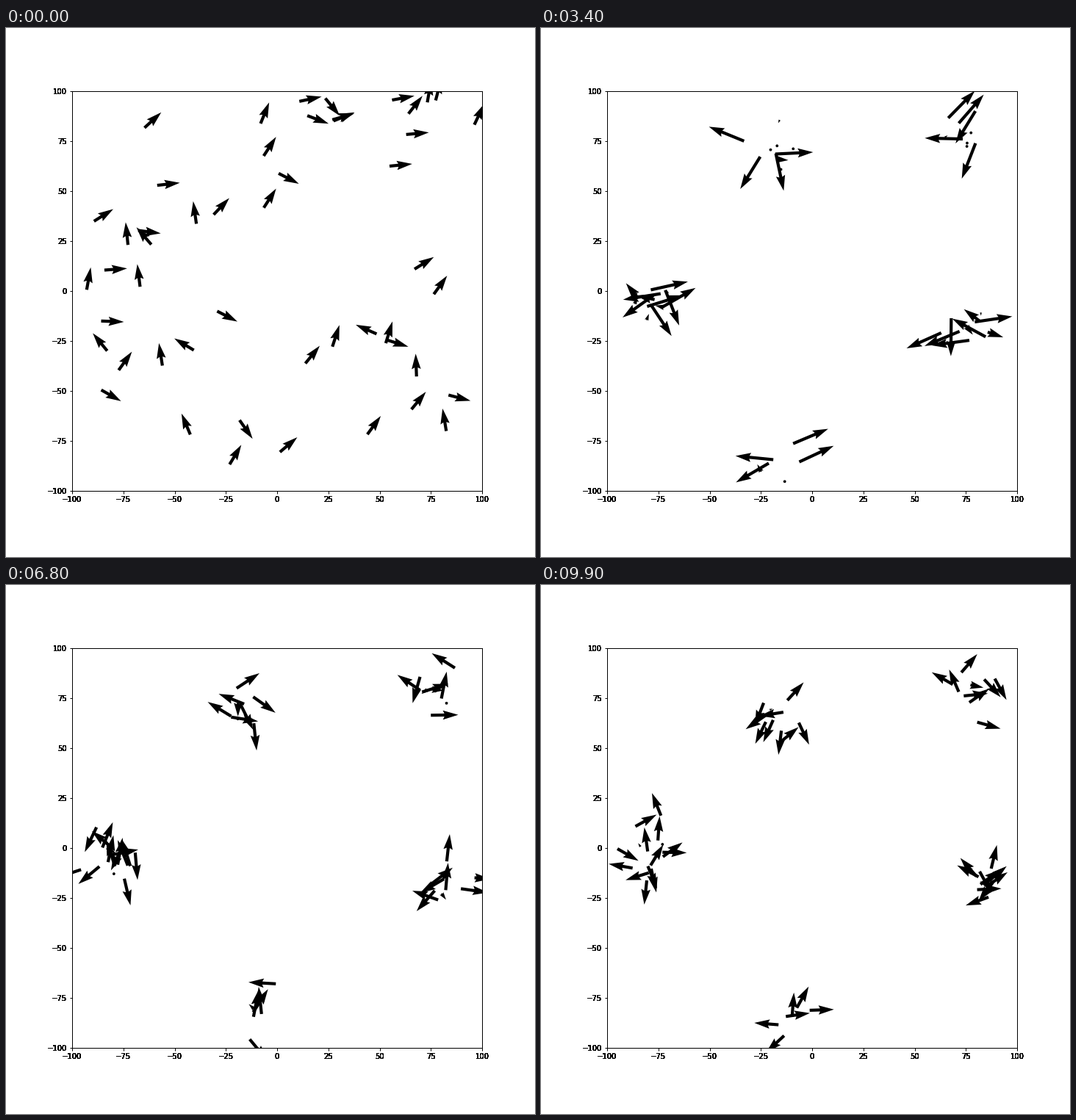
These frames come from a looping animation (720x720 px, 10 s). A matplotlib script:

```python
import numpy as np
import matplotlib.pyplot as plt
from matplotlib.animation import FuncAnimation

FRAMES, INTERVAL = 100, 100
LIMIT, TICK = 100, 25
TOP_SPEED = 2.6
CENTRES = np.array([(-75, -4), (-17, 70), (75, 80), (83, -17), (-10, -85)])
SIZES = [15, 10, 9, 10, 6]


def polar(length, angle):
    return np.column_stack([length * np.cos(angle), length * np.sin(angle)])


def lengths(vec):
    return np.linalg.norm(vec, axis=1)


def fold(pos, edge=97):
    """Reflect points beyond the edge back into the box."""
    return np.where(np.abs(pos) > edge, np.sign(pos) * 2 * edge - pos, pos)


def simulate():
    """Agents fly in from around their centre, then mill about it."""
    rng = np.random.default_rng(7)
    centre = np.repeat(CENTRES, SIZES, axis=0)
    n = len(centre)
    home = centre + rng.normal(0, 3.5, (n, 2))
    pos = fold(centre + polar(rng.uniform(10, 58, n),
                              rng.uniform(-np.pi, np.pi, n)))
    vel = polar(TOP_SPEED, np.radians(rng.normal(55, 50, n)))

    states = []
    for t in range(FRAMES):
        states.append((pos, vel))
        to_home = home - pos
        dist = lengths(to_home)
        bearing = np.arctan2(to_home[:, 1], to_home[:, 0])

        # far agents turn smoothly at top speed
        steer = 0.6 * vel + 0.4 * polar(TOP_SPEED, bearing)
        steer *= TOP_SPEED / np.maximum(lengths(steer), 1e-6)[:, None]

        # near agents pick a fresh heading now and then
        busy = 0.8 - 0.7 * np.exp(-t / 22)
        lazy = TOP_SPEED * 0.6 * rng.random(n) ** 2
        speed = np.where(rng.random(n) < busy, TOP_SPEED, lazy)
        angle = np.where(dist > 6, bearing + rng.normal(0, 0.6, n),
                         rng.uniform(-np.pi, np.pi, n))
        fresh = rng.random(n) < np.where(dist > 8, 0.7, 0.4)
        drift = np.where(fresh[:, None], polar(speed, angle), vel)

        near = dist < 11 + 12 * np.exp(-t / 20)
        vel = np.where(near[:, None], drift, steer)
        pos = pos + vel
    return states


def mean_scale(vel):
    return 18 * lengths(vel).mean()


def overprint_labels(ax, copies=12):
    """Repeat the tick labels in place, which makes them heavy."""
    x_trans, x_va, x_ha = ax.get_xaxis_text1_transform(7)
    y_trans, y_va, y_ha = ax.get_yaxis_text1_transform(7)
    for v in range(-LIMIT, LIMIT + 1, TICK):
        label = str(v).replace("-", "\u2212")
        for _ in range(copies):
            ax.text(v, 0, label, transform=x_trans, va=x_va, ha=x_ha)
            ax.text(0, v, label, transform=y_trans, va=y_va, ha=y_ha)


states = simulate()

plt.rcParams.update({"axes.linewidth": 1,
                     "xtick.major.width": 1, "ytick.major.width": 1})
fig = plt.figure(figsize=(10, 10), dpi=72, facecolor="white")
fig.subplots_adjust(left=0.125, right=0.9, bottom=0.125, top=0.88)
ax = fig.add_subplot()
ax.set(xlim=(-LIMIT, LIMIT), ylim=(-LIMIT, LIMIT))
overprint_labels(ax)

pos, vel = states[0]
arrows = ax.quiver(*pos.T, *vel.T, scale=mean_scale(vel))


def update(i):
    pos, vel = states[i]
    arrows.set_offsets(pos)
    arrows.scale = mean_scale(vel)
    arrows.set_UVC(*vel.T)
    return (arrows,)


anim = FuncAnimation(fig, update, frames=FRAMES, interval=INTERVAL,
                     repeat=True, repeat_delay=0)
plt.show()
```
